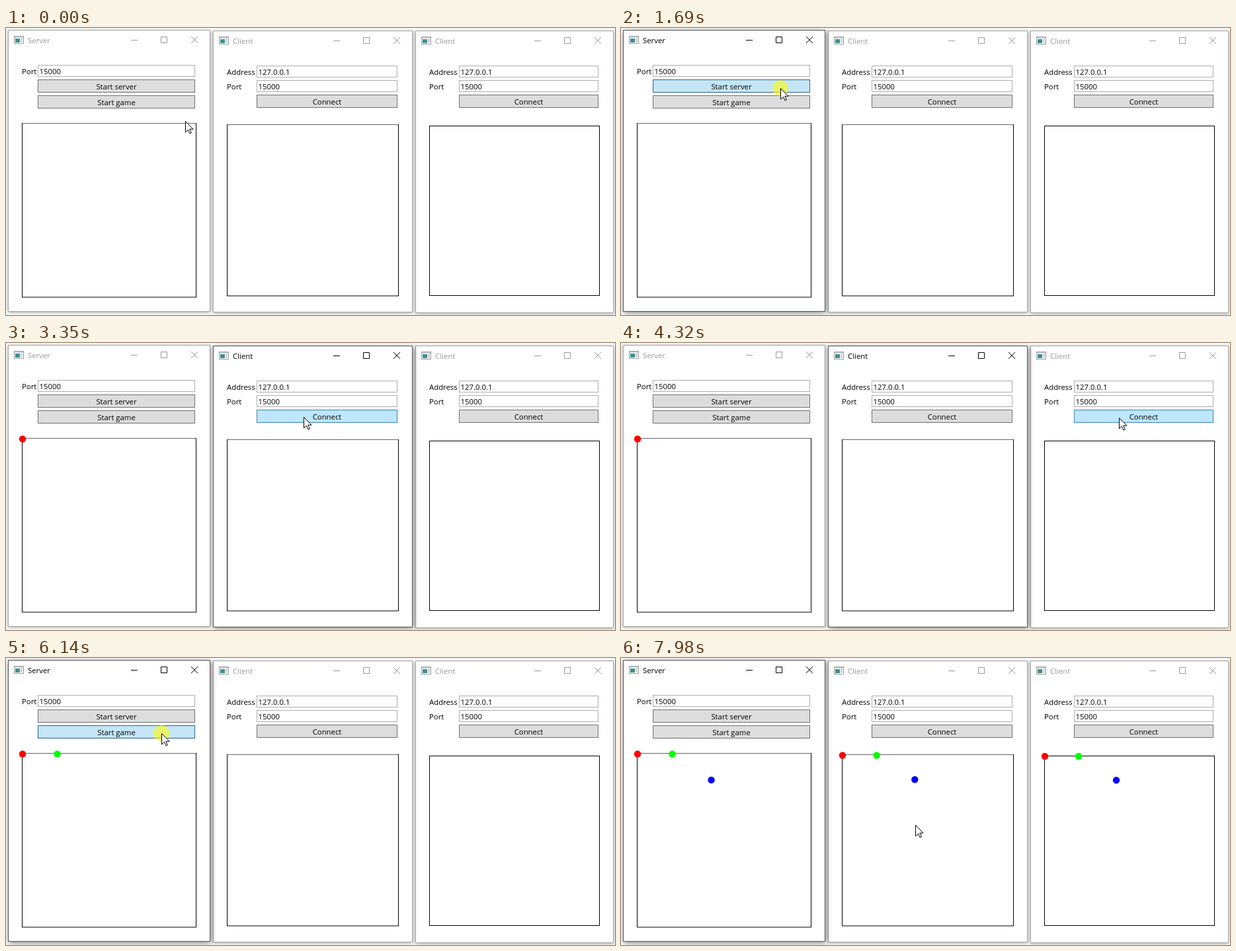
Write an HTML page that moves like this. It is 921 by 435 pixels and loops after 8000 ms.

```html
<!DOCTYPE html>
<html lang="en">
<head>
<meta charset="utf-8">
<title>Server and clients</title>
<style>
html, body { margin: 0; width: 100%; height: 100%; overflow: hidden; background: #fff; }
svg { display: block; width: 921px; height: 435px; font: 11.35px "Open Sans", "Noto Sans", sans-serif; }
.frame { fill: #fff; stroke: #aaa; filter: drop-shadow(0 1px 2.5px rgba(0,0,0,.4)); }
.title { fill: #999; }
.ctl { fill: none; stroke: #999; }
.active .frame { stroke: #555; filter: drop-shadow(1px 2px 4px rgba(0,0,0,.5)); }
.active .title { fill: #000; }
.active .ctl { stroke: #000; }
.input { fill: #fff; stroke: #abadb3; }
.button { fill: #ddd; stroke: #707070; }
.button.hover { fill: #bee6fd; stroke: #3c7fb1; }
.button.pressed { fill: #c4e5f6; stroke: #2c628b; }
.field { fill: none; stroke: #000; }
</style>
</head>
<body>
<svg id="stage" viewBox="0 0 921 435">
  <g id="pointer">
    <circle id="glow" cy="0" r="12" fill="#ff0" fill-opacity=".58"/>
    <path d="M.5 .5V17L4.4 13.3 7 19 9.3 18 6.8 12.3H12Z" fill="#fff" stroke="#000"/>
  </g>
</svg>
<script>
const LOOP = 8000;
const COLORS = ['#f00', '#0f0', '#00f'];
const stage = document.getElementById('stage');
const pointer = document.getElementById('pointer');
const glow = document.getElementById('glow');
const buttons = [];

function add(parent, tag, attrs, text) {
  const el = document.createElementNS('http://www.w3.org/2000/svg', tag);
  for (const k in attrs) el.setAttribute(k, attrs[k]);
  if (text) el.textContent = text;
  return parent.appendChild(el);
}

const box = (g, cls, x, y, width, height) =>
  add(g, 'rect', { class: cls, x: x + .5, y: y + .5, width, height });
const label = (g, x, y, text) => add(g, 'text', { x, y }, text);

function makeWindow(title, x, y, right, bottom) {
  const g = add(stage, 'g', {});
  box(g, 'frame', x, y, right - x - 1, bottom - y - 1);
  const ix = x + 9, iy = y + 9;
  add(g, 'rect', { x: ix + .5, y: iy + .5, width: 14, height: 11, fill: '#fff', stroke: '#999' });
  add(g, 'rect', { x: ix + 1, y: iy + 1, width: 13, height: 2, fill: '#ccd3da' });
  add(g, 'rect', { x: ix + 2, y: iy + 4, width: 7, height: 6, fill: '#3f8f8f' });
  add(g, 'path', { d: `M${ix + 10} ${iy + 4.5}h3m-3 2h3m-3 2h3`, stroke: '#aaa' });
  add(g, 'text', { class: 'title', x: x + 30, y: y + 20 }, title);
  const cy = y + 15;
  add(g, 'path', { class: 'ctl',
    d: `M${right - 120} ${cy + .5}h10M${right - 74.5} ${cy - 4.5}h9v9h-9zM${right - 29} ${cy - 5}l10 10m0-10l-10 10` });
  return g;
}

function makeInput(g, x, y, w, text) {
  box(g, 'input', x, y, w, 17);
  label(g, x + 2.5, y + 14, text);
}

function makeButton(g, x, y, w, text) {
  const el = box(g, 'button', x, y, w, 19);
  label(g, x + (w + 1) / 2, y + 15, text).setAttribute('text-anchor', 'middle');
  buttons.push({ el, x, y, w });
}

function makeField(g, x, y, w, h, top) {
  box(g, 'field', x, y, w, h);
  add(g, 'path', { d: `M${x + 1} ${y + .5}h${w - 1}`, stroke: top });
}

function makeClient(x, y, right, bottom, inputWidth) {
  const g = makeWindow('Client', x, y, right, bottom);
  label(g, x + 21, 71, 'Address');
  label(g, x + 21, 93, 'Port');
  makeInput(g, x + 66, 57, inputWidth, '127.0.0.1');
  makeInput(g, x + 66, 79, inputWidth, '15000');
  makeButton(g, x + 66, 101, inputWidth, 'Connect');
  return g;
}

const server = makeWindow('Server', 3, 3, 309, 430);
label(server, 24, 70, 'Port');
makeInput(server, 48, 56, 237, '15000');
makeButton(server, 48, 78, 237, 'Start server');
makeButton(server, 48, 102, 237, 'Start game');
makeField(server, 24, 144, 263, 263.5, '#666');
const client1 = makeClient(313, 4, 615, 431, 212);
makeField(client1, 334, 146, 259, 259.5, '#666');
const client2 = makeClient(619, 4, 919, 432, 210);
makeField(client2, 640, 148, 257, 257, '#000');
stage.append(pointer);

// Players stand at fifths of each playing field's top edge.
const windows = [
  { g: server, x: 25, y: 145.5, size: 262.5, lag: 0 },
  { g: client1, x: 335, y: 147.5, size: 258, lag: 40 },
  { g: client2, x: 641, y: 149, size: 255, lag: 40 }
];
for (const w of windows)
  w.dots = COLORS.map(fill => add(w.g, 'circle', { r: 5.2, fill }));

// Pointer moves: start, end, x, y, sag
const moves = [
  [160, 210, 272, 140, 0],
  [1000, 1410, 241, 91, 0],
  [2300, 2580, 416, 122, 0],
  [2580, 3040, 450, 112, 0],
  [3680, 4140, 753, 113, 30],
  [4980, 5340, 241, 87, 0],
  [5480, 5620, 235, 114, 0],
  [6650, 7110, 148, 251, 0],
  [7470, 7980, 445, 253, 11]
];

// Clicks: press time, button, window brought to the front
const clicks = [[1690, 0, 0], [3170, 2, 1], [4370, 3, 2], [6040, 1, 0]];
const HOLD = 150, GLOW = 180;
const joined = [3320, 4520, 6190], gameStart = 6190, runStart = 7220;

const clamp = v => Math.max(0, Math.min(1, v));

function pointerAt(t) {
  let x = 271, y = 141;
  for (const [start, end, tx, ty, sag] of moves) {
    if (t < start) break;
    const p = clamp((t - start) / (end - start)), e = p * p * (3 - 2 * p);
    x += (tx - x) * e;
    y += (ty - y) * e + sag * Math.sin(Math.PI * e);
  }
  return [Math.round(x), Math.round(y)];
}

let front = null;
function raise(index) {
  if (index === front) return;
  front = index;
  windows.forEach((w, i) => {
    w.g.classList.toggle('active', i === index);
    if (index < 0 || i === index) stage.insertBefore(w.g, pointer);
  });
}

function draw(t) {
  const [px, py] = pointerAt(t);
  pointer.setAttribute('transform', `translate(${px} ${py})`);

  let active = -1, pressed = -1, lit = false;
  for (const [time, button, win] of clicks) {
    if (t < time) break;
    active = win;
    pressed = t < time + HOLD ? button : -1;
    lit = t < time + GLOW;
  }
  raise(active);
  glow.style.display = lit ? '' : 'none';

  buttons.forEach(({ el, x, y, w }, i) => {
    const over = px >= x && px <= x + w && py >= y && py < y + 20;
    el.classList.toggle('hover', over);
    el.classList.toggle('pressed', i === pressed);
  });

  windows.forEach((w, i) => w.dots.forEach((dot, k) => {
    const run = k === 2 ? Math.max(0, t - w.lag - runStart) / 760 : 0;
    dot.setAttribute('cx', w.x + w.size * (k * .2 + run * .025));
    dot.setAttribute('cy', w.y + w.size * run * .15);
    dot.style.display = t >= (i ? gameStart : joined[k]) ? '' : 'none';
  }));
}

const begin = performance.now();
function tick() {
  draw((performance.now() - begin) % LOOP);
  requestAnimationFrame(tick);
}
tick();
</script>
</body>
</html>
```
